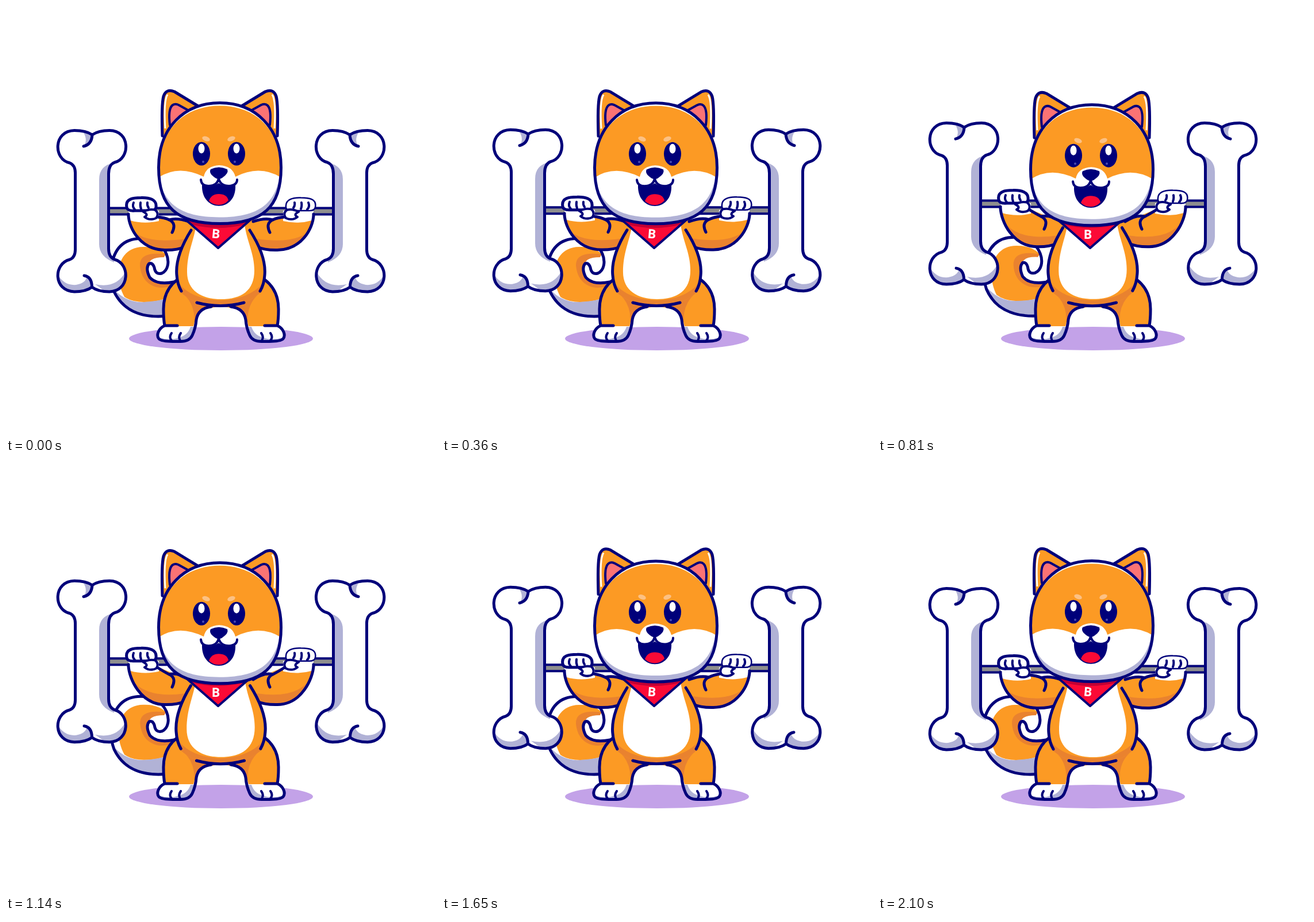
An HTML page that plays this animation: 748x748 px, repeating every 2130 ms.

```html
<!DOCTYPE html>
<html lang="en">
<head>
<meta charset="utf-8">
<title>Dog lifting bones</title>
<style>
html, body { margin: 0; width: 100%; height: 100%; overflow: hidden; background: #fff; }
svg { display: block; width: 100vw; height: 100vh; }
.ln { fill: none; stroke: #00007a; stroke-width: 5; stroke-linecap: round; stroke-linejoin: round; }
.thin { stroke-width: 4; }
.fist { stroke-width: var(--w, 5); }
.or { fill: #fc9a24; }
.dk { fill: #e9822f; }
.wh { fill: #fff; }
.lav { fill: #b1b2d6; }
.red { fill: #fb0a36; }
.navy { fill: #00007a; }
text { font: bold 22px "Open Sans", "Noto Sans", sans-serif; fill: #fff; text-anchor: middle; }
</style>
</head>
<body>
<svg viewBox="0 0 748 748">
<defs>
  <path id="skull" d="M372 168.500C434 168.500 478.500 212 478.500 281C478.500 350 447 378.500 372 378.500C297 378.500 265.500 350 265.500 281C265.500 212 310 168.500 372 168.500Z"/>
  <path id="boneShape" d="M120.500 292Q121 277 111 273C82 267 82 217 119 216.500Q139 216.500 150 224Q161 216.500 180 216.500C217 217 216 266 189 272Q178.500 276 178.500 292V422Q178.500 437 189 441C216 448 216 496 180 497Q160 497 149.500 489Q139 497 119 497C82 496 82 448 111 441Q121 437 120.500 422Z"/>
  <clipPath id="inSkull"><use href="#skull"/></clipPath>
  <clipPath id="inBone"><use href="#boneShape"/></clipPath>

  <g id="bone">
    <use href="#boneShape" class="wh"/>
    <g class="lav" clip-path="url(#inBone)">
      <path d="M188 273Q162 277 162 302V414Q162 436 188 446Z"/>
      <path d="M132 216Q144 232 135 244Q149 241 151 224Z"/>
      <path d="M88 464Q100 487 122 485Q139 482 141 470Q150 474 150 490L120 502L88 485Z"/>
      <path d="M155 484Q192 492 208 462L213 485L180 502Z"/>
    </g>
    <use href="#boneShape" class="ln"/>
    <path class="ln" d="M150 224Q149 241 135 244M136 469Q149 471 149.500 488"/>
  </g>

  <g id="arm">
    <path id="armFill" class="or"/>
    <path id="armShade" class="dk"/>
    <path id="cuff" class="wh"/>
    <path id="armLine" class="ln"/>
  </g>

  <g id="hand">
    <path class="wh ln fist" style="fill:#fff" d="M210 350C207 335 222 333.500 235 333.500C250 333 261 337 261 347Q262 355 254 356H224Q211 357 210 350Z"/>
    <path class="ln thin" d="M222 342Q219 349 224 354M234 342Q233 348 235 353M246 342Q245 347 248 351"/>
    <path class="ln thin" style="fill:#fff" d="M239 358Q250 352 260 355Q267 362 261 369Q250 374 241 367Q249 363 239 358Z"/>
  </g>

  <g id="leg">
    <path class="or" d="M299 477Q274 495 274 530L276 558H326Q330 535 342 528L374 522V478Z"/>
    <path class="dk" d="M304 497Q332 518 327 558H329Q331 530 346 524L374 520V505Z"/>
    <path class="wh" d="M276 557C265 561 261 573 266 579Q271 583.500 290 583.500H302Q319 584 324 573L330 557Z"/>
    <path class="lav" d="M267 577Q285 582 301 577Q316 573 321 558H329L323 575Q318 584 302 583.500H290Q272 584 267 577Z"/>
    <path class="ln" d="M298 476Q273 495 274 530Q274 545 276 556C265 561 261 573 266 579Q271 583.500 290 583.500H302Q319 584 324 573Q330 560 331 546Q334 526 357 523M276 556H298"/>
    <path class="ln thin" d="M288 569Q283 576 288 582M304 569Q299 576 303 582"/>
  </g>

  <g id="ear">
    <path class="or" d="M272 226C271 195 270.500 170 274 157Q279 143 293 149L334 174Z"/>
    <path d="M277 213Q274 165 281 154" fill="none" stroke="#fff" stroke-width="3"/>
    <path class="ln" d="M272 226C271 195 270.500 170 274 157Q279 143 293 149L334 174"/>
    <path class="ln thin" style="fill:#fb7374" d="M285 207C283 190 284 178 289 173Q293 169 300 172L318 182"/>
  </g>
</defs>

<ellipse cx="374" cy="578.500" rx="160" ry="20.500" fill="#c3a2e8"/>

<g id="tail">
  <path class="wh" d="M290 538C250 544 208 538 188 497Q180 475 183 455Q190 405 234 404.500C282 404 293 455 271 465Q260 468 258 455Q255 446 249 448Q242 456 250 472Q262 486 292 480Z"/>
  <path class="or" d="M206 506C186 470 194 420 238 419Q264 418 277 431Q280 437 262 436Q248 440 249 448Q242 456 250 472Q262 486 292 480V502Q270 515 240 515Q219 515 206 506Z"/>
  <path class="dk" d="M277 432Q232 426 233 452Q236 482 262 489Q278 492 292 485V480Q262 486 250 472Q242 456 249 447Q252 437 275 437Z"/>
  <path class="lav" d="M187 492Q210 517 240 515Q275 513 292 503V538C250 544 208 538 188 497Z"/>
  <path class="ln" d="M290 538C250 544 208 538 188 497Q180 475 183 455Q190 405 234 404.500C282 404 293 455 271 465Q260 468 258 455Q255 446 249 448Q242 456 250 472Q262 486 292 480"/>
</g>

<g class="lift">
  <rect class="ln thin" x="176" y="351.500" width="396" height="11" style="fill:#8e8e8e"/>
  <use href="#bone"/>
  <use href="#bone" transform="matrix(-1 0 0 1 748 0)"/>
</g>

<use href="#arm"/>
<use href="#arm" transform="matrix(-1 0 0 1 748 0)"/>
<use href="#leg"/>
<use href="#leg" transform="matrix(-1 0 0 1 748 0)"/>

<g id="torso">
  <path class="or" d="M322 372V388Q294 432 297 470Q297 490 306 500Q331 521 373 521Q416 521 441 500Q451 490 450 470Q453 432 424 388V372Z"/>
  <path class="dk" d="M299 480Q320 510 374 512Q424 510 449 480Q450 490 441 500Q416 521 373 521Q331 521 306 500Q298 490 299 480Z"/>
  <path class="wh" d="M330 385C326 410 315 430 315 463C315 495 340 510 374 510C410 510 432 495 432 460C432 430 419 410 415 380Z"/>
  <path class="ln" d="M322 390Q294 435 297 468Q298 484 305 496M424 390Q453 435 450 468Q449 484 442 496M332 516Q373 527 414 516"/>
</g>

<path class="red" d="M314 373L369 421L424 373Z"/>
<path d="M322 380Q369 392 416 380L424 373H314Z" fill="#c20034"/>
<path class="ln thin" d="M314 373L369 421L424 373"/>
<text id="letter" y="8">B</text>

<g id="head">
  <use href="#ear"/>
  <use href="#ear" transform="matrix(-1 0 0 1 744 0)"/>
  <use href="#skull" class="lav"/>
  <g clip-path="url(#inSkull)">
    <use href="#skull" class="wh" x="-1" y="-11"/>
    <path class="wh" d="M260 160H484V290H260Z"/>
    <path class="or" d="M264 299Q300 275 344 297Q348 278 371 277Q394 278 399 297Q442 275 480 299C482 215 434 173.500 372 173.500C310 173.500 262 215 264 299Z"/>
  </g>
  <use href="#skull" class="ln"/>
  <g fill="#fcc184">
    <ellipse rx="7" ry="4" transform="translate(348 231) rotate(20)"/>
    <ellipse rx="7" ry="4" transform="translate(392 231) rotate(-20)"/>
  </g>
  <g class="navy">
    <ellipse cx="340" cy="257" rx="15" ry="20.500"/>
    <ellipse cx="401" cy="257" rx="15" ry="20.500"/>
    <path d="M341 311Q355 319 370 308Q385 319 399 311C402 360 339 360 341 311Z"/>
    <path d="M356 284Q370 277 385 284Q388 291 376 299Q370 303 364 299Q352 291 356 284Z"/>
  </g>
  <g class="wh">
    <ellipse cx="340" cy="248" rx="5.500" ry="8.500"/>
    <ellipse cx="401" cy="248" rx="5.500" ry="8.500"/>
  </g>
  <g fill="#4a4ab0">
    <circle cx="343" cy="271" r="2"/>
    <circle cx="398" cy="271" r="2"/>
  </g>
  <path class="red" d="M353 339Q357 327 370 327Q384 327 387 338Q380 346 370 346Q360 346 353 339Z"/>
  <path class="ln thin" d="M339 302Q340 313 352 313Q368 313 370 299Q372 313 388 313Q402 312 402 302"/>
</g>

<g class="lift">
  <use href="#hand"/>
  <use href="#hand" transform="matrix(-1 0 0 1 748 0)" style="--w:2.500"/>
</g>
</svg>
<script>
const LOOP = 2130, STEP = 30;
const $ = id => document.getElementById(id);
const lifted = document.querySelectorAll('.lift');
const move = (el, value) => el.setAttribute('transform', value);
const draw = (id, path) => $(id).setAttribute('d', path);

function ease(x) {
  x = Math.min(1, Math.max(0, x));
  return x < 0.5 ? 4 * x ** 3 : 1 - 4 * (1 - x) ** 3;
}

// Wrist follows the bar, the elbow moves half as far, the shoulder stays.
function poseArm(rise) {
  const w = y => y - rise, e = y => y - rise * 0.45;
  const under = `M213 ${w(364)}C214 ${w(387)} 234 ${e(424)} 276 ${e(424.5)}Q298 ${e(425)} 311 ${e(419)}`;
  draw('armFill', `${under}L326 425V372L293 ${e(371)}L263 ${w(366)}Z`);
  draw('armShade', `M224 ${w(394)}Q250 ${e(414)} 312 ${e(405)}V${e(419)}Q298 ${e(425)} 276 ${e(424.5)}Q240 ${e(424)} 224 ${w(394)}Z`);
  draw('cuff', `M213 ${w(354)}Q213 ${w(366)} 216 ${w(373)}Q240 ${w(380)} 266 ${w(374)}V${w(356)}Z`);
  draw('armLine', `${under}M213 ${w(366)}V${w(362)}M263 ${w(367)}Q276 ${e(368)} 284 ${e(372)}Q297 ${e(378)} 289 ${e(394)}M284 ${e(372)}Q298 ${e(368)} 318 375`);
}

function frame(now) {
  const t = Math.floor(now % LOOP / STEP) * STEP;
  const u = t < 1000 ? ease((t - 100) / 900) : 1 - ease((t - 1000) / 1000);
  const rise = 13.4 * u;
  lifted.forEach(g => move(g, `translate(0 ${-rise})`));
  poseArm(rise);
  move($('head'), `translate(0 ${3.3 * u})`);
  move($('torso'), `translate(374 515) scale(${1 + 0.012 * u} ${1 + 0.035 * u}) translate(-374 -515)`);
  move($('letter'), `translate(365 ${396 + u}) rotate(${5 * (1 - u)})`);
  move($('tail'), `rotate(${2.5 * Math.exp(-(((t - 800) / 230) ** 2))} 285 510)`);
}

const start = performance.now();
function tick() {
  frame(performance.now() - start);
  requestAnimationFrame(tick);
}
tick();
</script>
</body>
</html>
```
